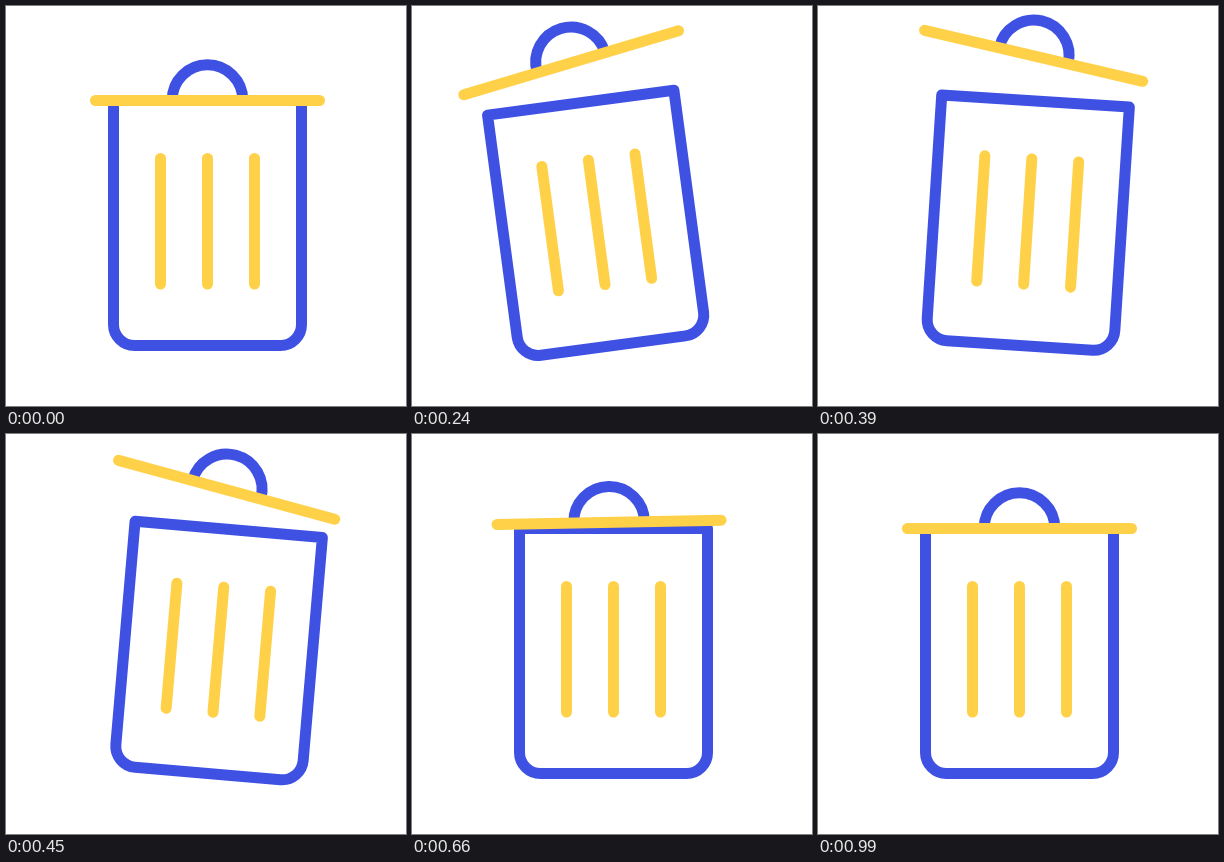
An HTML page with a canvas for the animation above (3020 ms loop, 400 px wide and 400 px high).

```html
<!DOCTYPE html>
<html lang="en">
<head>
<meta charset="utf-8">
<title>Trash can</title>
<style>
  html, body { margin: 0; width: 100%; height: 100%; overflow: hidden; background: #fff; }
  canvas { display: block; width: 100%; height: 100%; }
</style>
</head>
<body>
<canvas id="stage" width="400" height="400"></canvas>
<script>
const ctx = document.getElementById('stage').getContext('2d');
const LOOP = 3020, STEP = 30, END = 990;
const BLUE = '#3f51e3', YELLOW = '#ffd148';
const RAD = Math.PI / 180;

// All parts are centred on one vertical axis.
const AXIS = 201.5, TOP = 94.5, BOTTOM = 339.5, PIVOT = 342;
const HALF = 94, CORNER = 21, LID_HALF = 112, BAR_GAP = 47;

const easeOut = u => u * (2 - u);
const easeInOut = u => (1 - Math.cos(Math.PI * u)) / 2;

// Starts at 0 with a kick, then swings smoothly between turning points [ms, value].
function swing(...turns) {
  return t => {
    let from = 0, value = 0, ease = easeOut;
    for (const [to, next] of turns) {
      if (t < to) return value + (next - value) * ease((t - from) / (to - from));
      [from, value, ease] = [to, next, easeInOut];
    }
    return value;
  };
}

const canTilt = swing([165, -10.2], [442, 5], [540, 0]);
const lidTilt = swing([150, -14.8], [435, 11], [540, -3], [780, 0.8], [END, 0]);
const lidShift = swing([130, -5.6], [270, -4], [540, -6], [890, 0]);
const lidLift = swing([358, -45.8], [715, -3.8], [END, 0]);

function line(x0, y0, x1, y1) {
  ctx.beginPath();
  ctx.moveTo(x0, y0);
  ctx.lineTo(x1, y1);
  ctx.stroke();
}

function drawCan() {
  ctx.strokeStyle = BLUE;
  ctx.beginPath();
  ctx.moveTo(-HALF, TOP);
  ctx.lineTo(HALF, TOP);
  ctx.arcTo(HALF, BOTTOM, -HALF, BOTTOM, CORNER);
  ctx.arcTo(-HALF, BOTTOM, -HALF, TOP, CORNER);
  ctx.closePath();
  ctx.stroke();

  ctx.strokeStyle = YELLOW;
  for (let i = -1; i <= 1; i++) line(i * BAR_GAP, 152.5, i * BAR_GAP, 278);
}

function drawLid() {
  ctx.strokeStyle = BLUE;
  ctx.lineCap = 'butt';
  ctx.beginPath();
  ctx.arc(0, -0.5, 35.3, Math.PI, 0);
  ctx.stroke();

  ctx.strokeStyle = YELLOW;
  ctx.lineCap = 'round';
  line(-LID_HALF, 0, LID_HALF, 0);
}

function draw(t) {
  ctx.fillStyle = '#fff';
  ctx.fillRect(0, 0, 400, 400);
  ctx.lineWidth = 11;
  ctx.lineCap = ctx.lineJoin = 'round';

  ctx.save();
  ctx.translate(AXIS, PIVOT);
  ctx.rotate(canTilt(t) * RAD);
  ctx.translate(0, -PIVOT);
  drawCan();
  ctx.translate(lidShift(t), TOP + lidLift(t));
  ctx.rotate(lidTilt(t) * RAD);
  drawLid();
  ctx.restore();
}

const start = performance.now();
function tick() {
  const t = (performance.now() - start) % LOOP;
  draw(Math.min(END, Math.floor(t / STEP) * STEP));
  requestAnimationFrame(tick);
}
tick();
</script>
</body>
</html>
```
